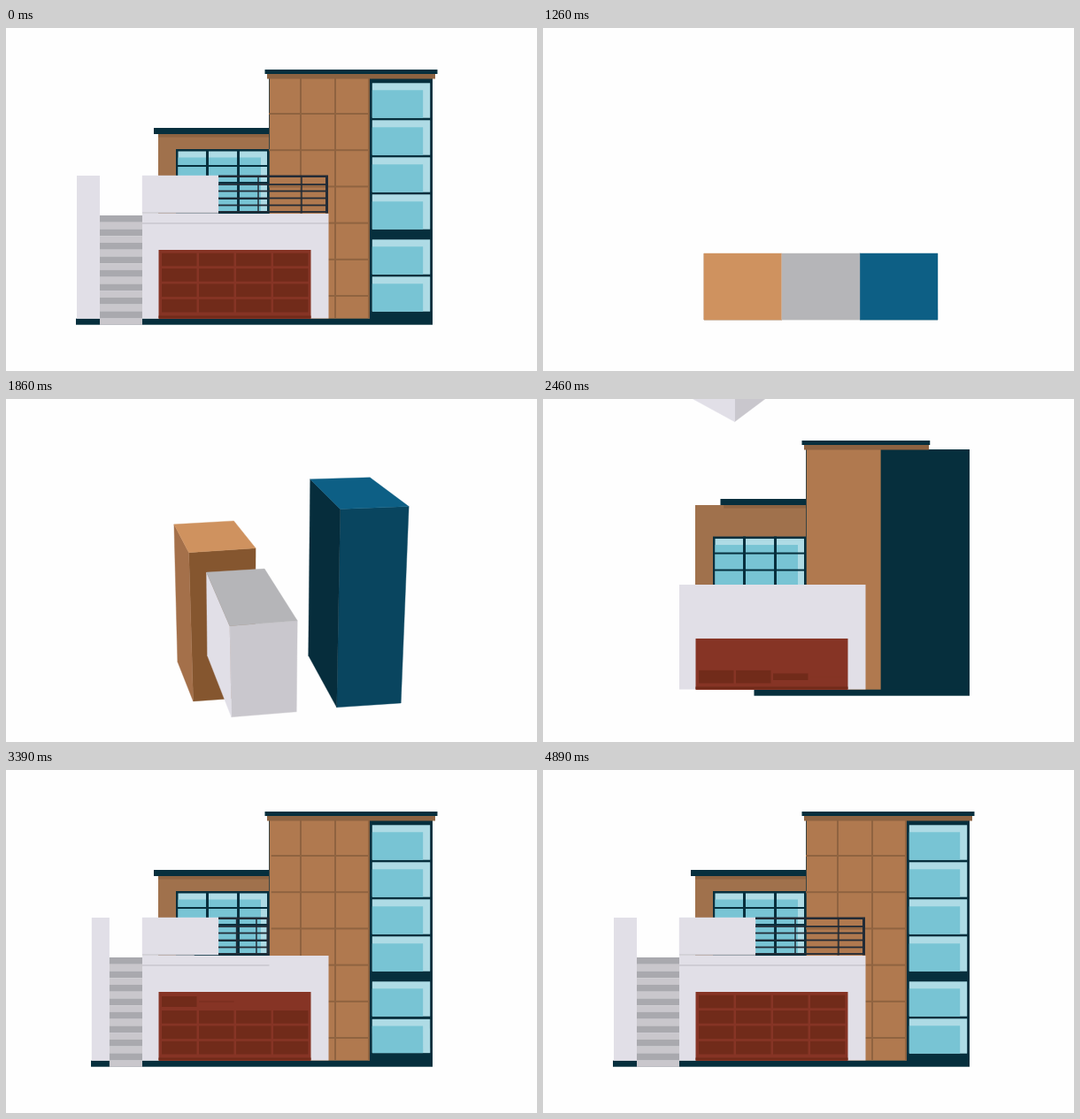
These frames come from a looping animation (600x388 px, 4920 ms). An HTML page with a canvas:

```html
<!DOCTYPE html>
<html lang="en">
<head>
<meta charset="utf-8">
<title>House build</title>
<style>
  html, body { margin: 0; width: 100%; height: 100%; overflow: hidden; background: #fefefe; }
  canvas { display: block; width: 600px; height: 388px; }
</style>
</head>
<body>
<canvas id="stage" width="600" height="388"></canvas>
<script>
const ctx = document.getElementById('stage').getContext('2d');
const LOOP = 4920, BUILD = 2170;
const NAVY = '#062f3d', GLASS = '#78c4d4', SHINE = '#aedbe5', WALL = '#e1dfe7';
const BROWN = '#a0714c', TAN = '#b0794f', SEAM = '#8f6340', SHADE = '#8d6341';
const DOOR = '#863425', PANEL = '#712b1a', RAIL = '#222b36';

const lerp = (a, b, k) => a + (b - a) * k;
const clamp = k => Math.max(0, Math.min(1, k));
const out = k => 1 - (1 - k) ** 3;
const inOut = k => k < .5 ? 4 * k ** 3 : 1 - 4 * (1 - k) ** 3;
const span = (t, start, dur, ease = out) => ease(clamp((t - start) / dur));

// Rectangle given by its left, top, right and bottom edges
function box(color, x0, y0, x1, y1) {
  ctx.fillStyle = color;
  ctx.fillRect(x0, y0, x1 - x0, y1 - y0);
}

function poly(color, ...points) {
  ctx.fillStyle = ctx.strokeStyle = color;
  ctx.lineWidth = .4;
  ctx.beginPath();
  points.forEach(([x, y]) => ctx.lineTo(x, y));
  ctx.closePath();
  ctx.fill();
  ctx.stroke();
}

function clipped(x0, y0, x1, y1, draw) {
  ctx.save();
  ctx.beginPath();
  ctx.rect(x0, y0, x1 - x0, y1 - y0);
  ctx.clip();
  draw();
  ctx.restore();
}

// Corners: top back-left, back-right, front-right, front-left,
// then bottom back-left, front-left, front-right
const solids = [
  { left: 182, top: '#cf925f', side: '#a4704a', front: '#85562f', face: [172, 120, 297, 328],
    rise: [[175,215],[257,212],[262,262],[170,266],[182,300],[176,352],[264,348]],
    turn: [[190,142],[258,138],[282,169],[206,174],[194,297],[211,342],[281,337]] },
  { left: 358, top: '#0d5f85', side: '#062d3c', front: '#09455f', face: [297, 57, 482, 328],
    rise: [[352,153],[440,151],[487,204],[368,207],[352,298],[370,357],[466,352]],
    turn: [[344,91],[412,89],[455,122],[377,125],[342,290],[373,349],[446,344]] },
  { left: 270, top: '#b5b5b8', side: WALL, front: '#c9c7cd', face: [154, 210, 364, 328],
    rise: [[262,245],[340,243],[352,306],[262,309],[262,305],[262,369],[350,366]],
    turn: [[227,196],[293,192],[329,251],[252,257],[228,290],[254,360],[328,354]] }
];

for (const s of solids) {
  const a = s.left, b = a + 88, [x0, y0, x1, y1] = s.face;
  s.flat = [[a,255],[b,255],[b,330],[a,330],[a,255],[a,330],[b,330]];
  s.flush = [[x0,y0],[x0,y0],[x1,y0],[x1,y0],[x0,y1],[x1,y1],[x1,y1]];
}

function squares(t) {
  const grow = span(t, 170, 420), slide = 88 * span(t, 600, 650, inOut);
  if (t >= 600) {
    box(solids[0].top, 270 - slide, 255, 358 - slide, 330);
    box(solids[1].top, 270 + slide, 255, 358 + slide, 330);
  }
  box(solids[2].top, 314 - 44 * grow, 292.5 - 37.5 * grow, 314 + 44 * grow, 292.5 + 37.5 * grow);
  if (slide > 87) box('#eee', 269.5, 255, 270.3, 330);
}

function blocks(t) {
  const [from, to, k] =
    t < 1600 ? ['flat', 'rise', span(t, 1250, 350, x => x * x)] :
    t < 1860 ? ['rise', 'turn', span(t, 1600, 260, x => x)] :
               ['turn', 'flush', span(t, 1860, BUILD - 1860, x => 1 - (1 - x) ** 2)];
  for (const s of solids) {
    const p = s[from].map(([x, y], i) => [lerp(x, s[to][i][0], k), lerp(y, s[to][i][1], k)]);
    poly(s.front, p[3], p[2], p[6], p[5]);
    poly(s.side, p[0], p[3], p[5], p[4]);
    poly(s.top, p[0], p[1], p[2], p[3]);
  }
}

function terraceWindow(top) {
  clipped(192, 130, 298, 210, () => {
    box(NAVY, 192, top, 298, top + 73);
    box(SHINE, 194.5, top + 2.5, 295, top + 70);
    box(GLASS, 194.5, top + 9.5, 288, top + 70);
    for (const x of [226, 261]) box(NAVY, x, top, x + 3, top + 73);
    for (const y of [18, 37, 55]) box(NAVY, 192, top + y, 298, top + y + 2);
  });
}

function towerSeams(t) {
  [372, 333].forEach((x, i) => box(SEAM, x - 1, 57, x + 1, 57 + 271 * span(t, 2750 + 110 * i, 600)));
  box(SEAM, 409, 57, 411, 57 + 271 * span(t, 2700, 600));
  for (let i = 0; i < 6; i++) {
    const y = 97 + 41.2 * i;
    box(SEAM, 410 - 113 * span(t, i < 3 ? 2965 : 2988, 600), y - 1, 410, y + 1);
  }
}

// Each pane flips open around its middle
function towerPanes(t) {
  for (let i = 0; i < 6; i++) {
    const s = span(t, 2610 + 115 * i, 300);
    if (!s) continue;
    const mid = 82 + 42 * i + (i > 3 ? 9 : 0), h = 19.5 * s, k = 2 * (1 - s);
    const top = mid - h, low = mid + h, inner = top + 8 * s;
    poly(SHINE, [414 - k, top], [479 - k, top], [479 + k, low], [414 + k, low]);
    poly(GLASS, [414 - k, inner], [471 - k, inner], [471 + k, low], [414 + k, low]);
  }
}

function garage(t, rise) {
  const top = 328 - 77 * rise;
  clipped(172.5, top, 344.5, 329, () => {
    box(DOOR, 172, top, 345, 329);
    // Panels fill from the bottom, turning back at each row's end
    for (let i = 0; i < 16; i++) {
      const row = i >> 2, col = row % 2 ? i % 4 : i % 4;
      const c = row === 2 ? 3 - col : col;
      const h = 7.3 * span(t, BUILD + 90 * i, 220, inOut);
      const x = 176 + 42 * c, y = 314.2 - 17.4 * row;
      box(PANEL, x, y - h, x + 39.5, y + h);
    }
    box(PANEL, 172, 325.5, 345, 328);
  });
}

function parapet(t) {
  const e = span(t, 2410, 885), r = 1 - e;
  if (t < 2410) return;
  const x = lerp(212, 240, e), y = lerp(-10, 209, e), h = 42;
  const lx = x - 86 + 13 * r, ly = y - 49 * r, rx = x + 60 * r, ry = y - 45 * r;
  if (r > .001) {
    poly('#c9c7cd', [x, y], [rx, ry], [rx, ry - h], [x, y - h]);
    poly('#b5b5b8', [x, y - h], [rx, ry - h], [lx + rx - x, ly + ry - y - h], [lx, ly - h]);
  }
  poly(WALL, [x, y], [lx, ly], [lx, ly - h], [x, y - h]);
}

function railing(t) {
  const e = span(t, 3240, 820);
  if (!e) return;
  const at = x => 240 + (x - 240) * e;
  box(RAIL, 240, 166.5, at(364), 169);
  for (const y of [177, 184.5, 192.5, 200.5, 208]) box(RAIL, 240, y - .9, at(364), y + .9);
  for (const [x, w] of [[285, 1.5], [334, 1.5], [362.5, 3]]) box(RAIL, at(x) - w / 2, 167, at(x) + w / 2, 209.5);
}

function house(t) {
  const e = span(t, BUILD, 800), side = span(t, 3040, 900);
  const left = w => 154 - w * side;

  box(BROWN, 172, 120, 298, 328);
  terraceWindow(209 - 72 * e);
  box(SHADE, lerp(297, 172, e), 120, 298, 123.5);
  box(NAVY, lerp(297, 167, e), 113, 298, 120);

  box(NAVY, 297, 57, 482, 329);
  box(TAN, 297.7, 57, lerp(297, 411, e), 329);
  towerSeams(t);
  towerPanes(t);
  box(SHADE, 295, 52, lerp(295, 485, e), 57.5);
  box(NAVY, 292.5, 47, lerp(292.5, 487.5, e), 52);

  box(NAVY, lerp(482, 154, e) - 75 * side, 328.7, 482, 335.7);
  if (side) {
    box(WALL, left(74), 167, left(48), 328.7);
    for (let i = 0; i < 16; i++) {
      const y = 212 + 7.74 * i;
      box(i % 2 ? '#c9c7cc' : '#a9a9ae', left(48), y, 154, y + 7.8);
    }
  }

  box(WALL, 154, 210, 364.5, 328.5);
  garage(t, e);
  parapet(t);
  const trim = span(t, 3200, 600);
  if (trim) {
    box('#c5c3ca', 154, 208.5, lerp(154, 240, trim), 209.7);
    box('#c5c3ca', 154, 220.3, lerp(154, 364, trim), 221.6);
  }
  railing(t);
}

function frame(now) {
  const t = now % LOOP;
  box('#fefefe', 0, 0, 600, 388);
  if (t < 60) house(LOOP);
  else if (t < 1250) squares(t);
  else if (t < BUILD) blocks(t);
  else house(t);
  requestAnimationFrame(frame);
}

const start = performance.now();
requestAnimationFrame(() => frame(0));
function tick() { return performance.now() - start; }
</script>
</body>
</html>
```
